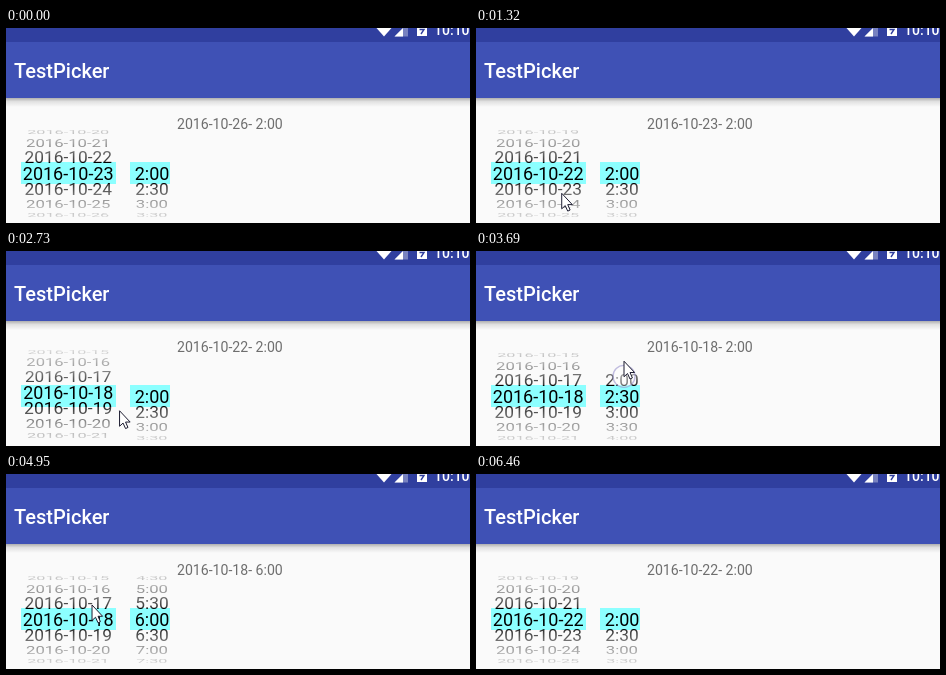
Animation of 464x195 px, one loop 7520 ms. Source, as an HTML page:

```html
<!DOCTYPE html>
<html lang="en">
<head>
<meta charset="utf-8">
<title>Date and time wheel picker</title>
<style>
  html, body { margin: 0; width: 100%; height: 100%; overflow: hidden; background: #fafafa; }
  svg { display: block; width: 464px; height: 195px; font-family: Roboto, sans-serif; }
  .wheel text { font-size: 18px; text-anchor: middle; }
</style>
</head>
<body>
<svg viewBox="0 0 464 195">
  <defs>
    <linearGradient id="shadow" x2="0" y2="1">
      <stop stop-color="#000" stop-opacity=".3"/>
      <stop offset=".4" stop-color="#000" stop-opacity=".1"/>
      <stop offset="1" stop-color="#000" stop-opacity="0"/>
    </linearGradient>
    <linearGradient id="fade" x2="0" y2="1">
      <stop stop-color="#fafafa" stop-opacity=".9"/>
      <stop offset=".5" stop-color="#fafafa" stop-opacity=".64"/>
      <stop offset="1" stop-color="#fafafa" stop-opacity=".2"/>
    </linearGradient>
    <clipPath id="window"><rect y="97" width="464" height="96"/></clipPath>
  </defs>

  <rect width="464" height="195" fill="#fafafa"/>
  <rect y="70" width="464" height="9" fill="url(#shadow)"/>
  <rect width="464" height="70" fill="#3f51b5"/>
  <rect width="464" height="14" fill="#303f9f"/>
  <g fill="#fff">
    <path d="M370.5 0H385.5L378 8.5Z"/>
    <path d="M402 0V8.5H388.5L397 0Z" opacity=".35"/>
    <path d="M397 0V8.5H388.5Z"/>
    <path d="M411 0H421V8H411Z"/>
    <path d="M413.5 1.5H418L415 6" fill="none" stroke="#303f9f" stroke-width="1.4"/>
    <text x="428" y="7" font-size="14" font-weight="500">10:10</text>
    <text x="8" y="50" font-size="20" font-weight="500">TestPicker</text>
  </g>
  <text id="label" x="171" y="101" font-size="14.1" fill="#6e6e6e"></text>

  <rect x="15" y="134" width="95" height="22" fill="#8cffff"/>
  <rect x="124" y="134" width="40" height="22" fill="#8cffff"/>
  <g clip-path="url(#window)">
    <g class="wheel" id="dates"></g>
    <g class="wheel" id="times"></g>
  </g>
  <rect x="10" y="97" width="160" height="37" fill="url(#fade)"/>
  <rect x="10" y="97" width="160" height="37" fill="url(#fade)" transform="matrix(1 0 0 -1 0 290)"/>

  <circle id="touch" r="11" fill="#fff" fill-opacity=".35" stroke="#8f88c8" stroke-opacity=".55" stroke-width="1.3"/>
  <path id="cursor" d="M0 0V15.5L3.5 12.3L6 17.8L8.4 16.7L6 11.3H10.6Z" fill="#fff" stroke="#1c1c30" stroke-linejoin="round"/>
</svg>
<script>
const LOOP = 7520, STEP = 410 / 3, PHASE = 28;
const RESET = 6420;
const CENTER = 145.2, RADIUS = 51.5, PITCH = Math.PI / 10;
const $ = id => document.getElementById(id);

const smooth = p => p * p * (3 - 2 * p);
const glide = p => 1 - (1 - p) ** 3;
const lerp = (a, b, p) => a + (b - a) * p;
const progress = (t, from, to) => Math.min(1, Math.max(0, (t - from) / (to - from)));

// Wheel positions, in items.
const dateAt = t => 23 - smooth(progress(t, 690, 1160))
  - 4 * glide(progress(t, 2187, 3100))
  + 4 * glide(progress(t, 5250, 6150));
const timeAt = t => t < RESET ? 8 * smooth(progress(t, 3486, 4410)) : 0;

// The label takes over the wheel values at these moments.
const commits = [130, 1500, 3160, 4560, RESET];

const drags = [
  { start: 640, end: 1070, x: 86, y0: 136, y1: 174 },
  { start: 2050, end: 2330, x: 84, y0: 112, y1: 175 },
  { start: 3480, end: 3850, x: 148, y0: 142, y1: 86 },
  { start: 5230, end: 5490, x: 86, y0: 131, y1: 98 },
];

const formatDate = n => "2016-10-" + n;
const formatTime = n => n < 0 ? "" : `\u00a0${2 + Math.floor(n / 2)}:${n % 2 ? "30" : "00"}`;

function makeWheel(id, x, format) {
  const rows = Array.from({ length: 9 }, () => {
    const row = document.createElementNS("http://www.w3.org/2000/svg", "text");
    row.setAttribute("y", 6.6);
    return $(id).appendChild(row);
  });
  return pos => rows.forEach((row, i) => {
    const item = Math.round(pos) + i - 4;
    const angle = (item - pos) * PITCH, sin = Math.sin(angle);
    row.textContent = Math.abs(angle) < 1.15 ? format(item) : "";
    row.setAttribute("transform", `translate(${x} ${CENTER + RADIUS * sin}) ` +
      `scale(${1 - 0.12 * Math.abs(sin)} ${Math.cos(angle) ** 2})`);
  });
}

const drawDates = makeWheel("dates", 62.2, formatDate);
const drawTimes = makeWheel("times", 143.8, formatTime);

// During a drag the pointer moves evenly; in between it glides to the next one.
function pointerAt(t) {
  const i = Math.max(0, drags.findLastIndex(d => d.start <= t));
  const drag = drags[i], next = drags[i + 1];
  if (t <= drag.end || !next) {
    return [drag.x, lerp(drag.y0, drag.y1, progress(t, drag.start, drag.end))];
  }
  const p = smooth(progress(t, drag.end, next.start - 300));
  return [lerp(drag.x, next.x, p), lerp(drag.y1, next.y0, p)];
}

function place(el, visible, [x, y]) {
  el.setAttribute("visibility", visible ? "visible" : "hidden");
  el.setAttribute("transform", `translate(${x} ${y})`);
}

function render(t) {
  drawDates(dateAt(t));
  drawTimes(timeAt(t));

  const commit = commits.findLast(c => c <= t);
  const day = commit ? Math.round(dateAt(commit)) : 26;
  $("label").textContent = `${formatDate(day)}-${formatTime(Math.round(timeAt(commit || 0)))}`;

  place($("cursor"), t > 270 && t < 5500, pointerAt(t));
  // The touch ring trails the pointer slightly.
  const drag = drags.find(d => t >= d.start && t <= d.end);
  place($("touch"), drag, pointerAt(drag ? Math.max(drag.start, t - 100) : t));
}

const begin = performance.now();
function tick() {
  const t = (performance.now() - begin) % LOOP;
  render(Math.floor((t + PHASE) / STEP) * STEP);
  requestAnimationFrame(tick);
}
tick();
</script>
</body>
</html>
```
